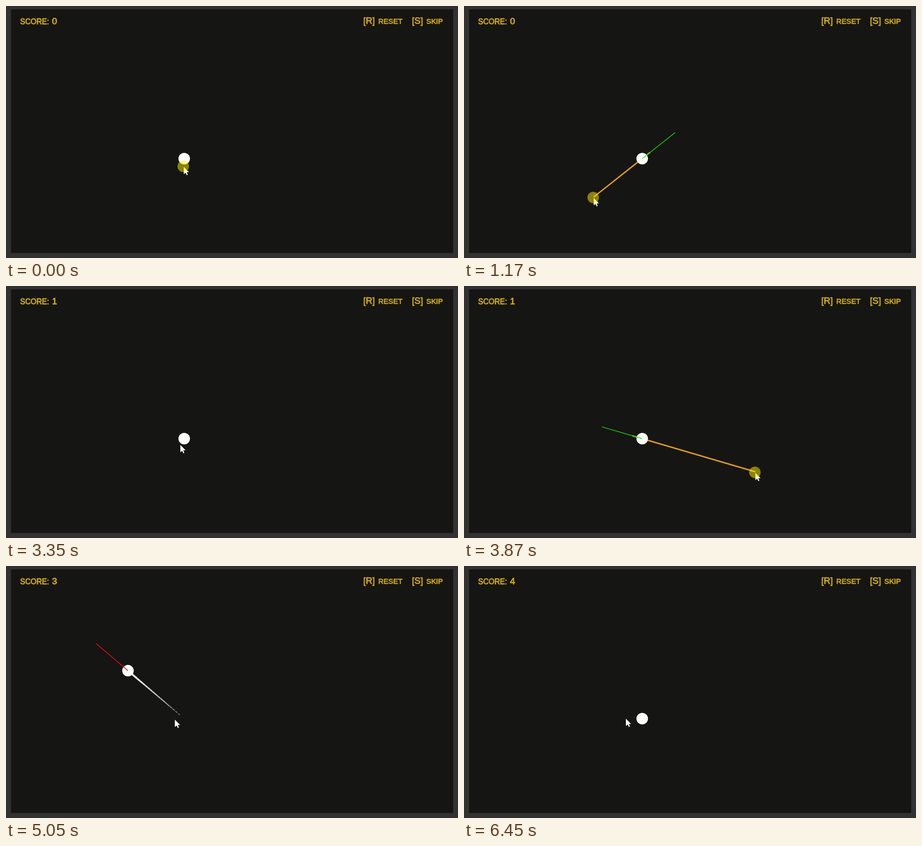
An HTML page with a canvas that plays this animation: 941 px wide and 525 px high, repeating every 6530 ms.

```html
<!DOCTYPE html>
<html lang="en">
<head>
<meta charset="utf-8">
<title>Pull and shoot</title>
<style>
  html, body { margin: 0; width: 100%; height: 100%; overflow: hidden; background: #323232; }
  canvas { display: block; }
</style>
</head>
<body>
<canvas id="stage" width="941" height="525"></canvas>
<script>
const ctx = document.getElementById('stage').getContext('2d');
const LOOP = 6530, TICK = 73.3, LEAD = 28, LAST = 88;
const HOME = { x: 371, y: 318 };
const REST = { x: 337, y: 318 };
const RADIUS = 12, AIM = 87.5, OVERSHOOT = 21;

// Per shot, in ticks: the pointer leaves, presses, is fully pulled, launches; the ball is reset at end.
const shots = [
  { leave: 0, press: 0, pulled: 16, launch: 24.6, end: 37, from: { x: 370, y: 335 }, to: { x: 270, y: 400 }, bend: 14 },
  { leave: 40, press: 46.5, pulled: 54, launch: 54.3, end: 60, from: { x: 363, y: 331 }, to: { x: 619, y: 387 }, bend: 12 },
  { leave: 59, press: 61.5, pulled: 63.5, launch: 63.6, end: 70, from: { x: 400, y: 336 }, to: { x: 446, y: 384 }, bend: 0 },
  { leave: 66, press: 70, pulled: 75, launch: 76, end: 82, from: { x: 350, y: 319 }, to: { x: 477, y: 193 }, bend: 0 }
];

const clamp = u => Math.max(0, Math.min(1, u));
const easeOut = u => 1 - (1 - u) ** 3;
const easeInOut = u => u * u * (3 - 2 * u);
const mix = (a, b, u) => ({ x: a.x + (b.x - a.x) * u, y: a.y + (b.y - a.y) * u });
const along = (p, dir, d) => ({ x: p.x + dir.x * d, y: p.y + dir.y * d });

// Unit vector from the grip through the ball's resting place, with the pull length
function aimFrom(grip) {
  const dx = HOME.x - grip.x, dy = HOME.y - grip.y, len = Math.hypot(dx, dy) || 1;
  return { x: dx / len, y: dy / len, len };
}

const gripOf = p => ({ x: p.x, y: p.y - 2 });

function pointerAt(k) {
  let p = shots[0].from;
  for (const s of shots) {
    if (k < s.leave) return p;
    if (k < s.press) return mix(p, s.from, easeOut((k - s.leave) / (s.press - s.leave)));
    const u = clamp((k - s.press) / (s.pulled - s.press));
    p = mix(s.from, s.to, easeInOut(u));
    p.y += s.bend * Math.sin(Math.PI * u);
  }
  return mix(p, REST, easeInOut(clamp((k - 82) / (LAST - 82))));
}

function line(a, b, color, width) {
  ctx.strokeStyle = color;
  ctx.lineWidth = width;
  ctx.beginPath();
  ctx.moveTo(a.x, a.y);
  ctx.lineTo(b.x, b.y);
  ctx.stroke();
}

function disc(p, r, color) {
  ctx.fillStyle = color;
  ctx.beginPath();
  ctx.arc(p.x, p.y, r, 0, Math.PI * 2);
  ctx.fill();
}

function text(str, x, y, size) {
  ctx.font = `${size}px "Liberation Sans", Arial, sans-serif`;
  ctx.fillText(str, x, y);
  ctx.strokeText(str, x, y);
}

function drawHud(score) {
  ctx.fillStyle = ctx.strokeStyle = '#d8b20c';
  ctx.lineWidth = 0.8;
  text('SCORE:', 29.5, 38, 15.7);
  text(score, 95.8, 38, 19);
  text('[R]', 743.8, 37, 19);
  text('RESET', 775, 37, 15.2);
  text('[S]', 845, 37, 19);
  text('SKIP', 875, 37, 15.2);
}

// Dots at the tail that merge and swell towards the ball
function drawTrail(dir, dist) {
  const step = 7;
  for (let d = 12; d < dist; d += step) {
    const u = d / dist;
    const dash = step * Math.min(1.1, 0.5 + 2 * u);
    const color = `rgba(255,255,255,${0.5 + 0.45 * u})`;
    line(along(HOME, dir, d), along(HOME, dir, Math.min(d + dash, dist)), color, 1.2 + 3 * u);
  }
}

function drawPointer({ x, y }) {
  const arrow = new Path2D('M0 0V15.5L3.7 12.2 6.2 17.4 8.4 16.4 6.1 11.3H11Z');
  ctx.save();
  ctx.translate(x, y);
  ctx.strokeStyle = '#0a0a0a';
  ctx.lineWidth = 1;
  ctx.stroke(arrow);
  ctx.fillStyle = '#fff';
  ctx.fill(arrow);
  ctx.restore();
}

function draw(k) {
  ctx.fillStyle = '#323232';
  ctx.fillRect(0, 0, 941, 525);
  ctx.fillStyle = '#151513';
  ctx.fillRect(10.5, 7, 920.5, 507.5);

  const pointer = pointerAt(k);
  const held = shots.find(s => k >= s.press && k < s.launch);
  const flying = shots.find(s => k > s.launch && k < s.end);
  drawHud(shots.filter(s => k > s.launch).length);

  let ball = HOME, dir = null, color;
  if (flying) {
    dir = aimFrom(gripOf(flying.to));
    color = '#e60c08';
    // Launch speed grows with the pull
    const dist = dir.len * 0.289 * (k - flying.launch);
    ball = along(HOME, dir, dist);
    drawTrail(dir, dist);
  } else if (held && k > 0) {
    const grip = gripOf(pointer);
    dir = aimFrom(grip);
    color = '#0ce00c';
    line(grip, along(HOME, dir, OVERSHOOT), '#e8a010', 2.8);
  }
  disc(ball, RADIUS, '#fff');
  if (dir) line(ball, along(ball, dir, AIM), color, 1.5);

  drawPointer(pointer);
  if (held) disc({ x: pointer.x - 1, y: pointer.y - 1 }, RADIUS, 'rgba(255,240,0,0.5)');
}

const start = performance.now();
function tick() {
  const t = (performance.now() - start) % LOOP;
  draw(Math.min(LAST, Math.floor((t + LEAD) / TICK)));
  requestAnimationFrame(tick);
}
tick();
</script>
</body>
</html>
```
